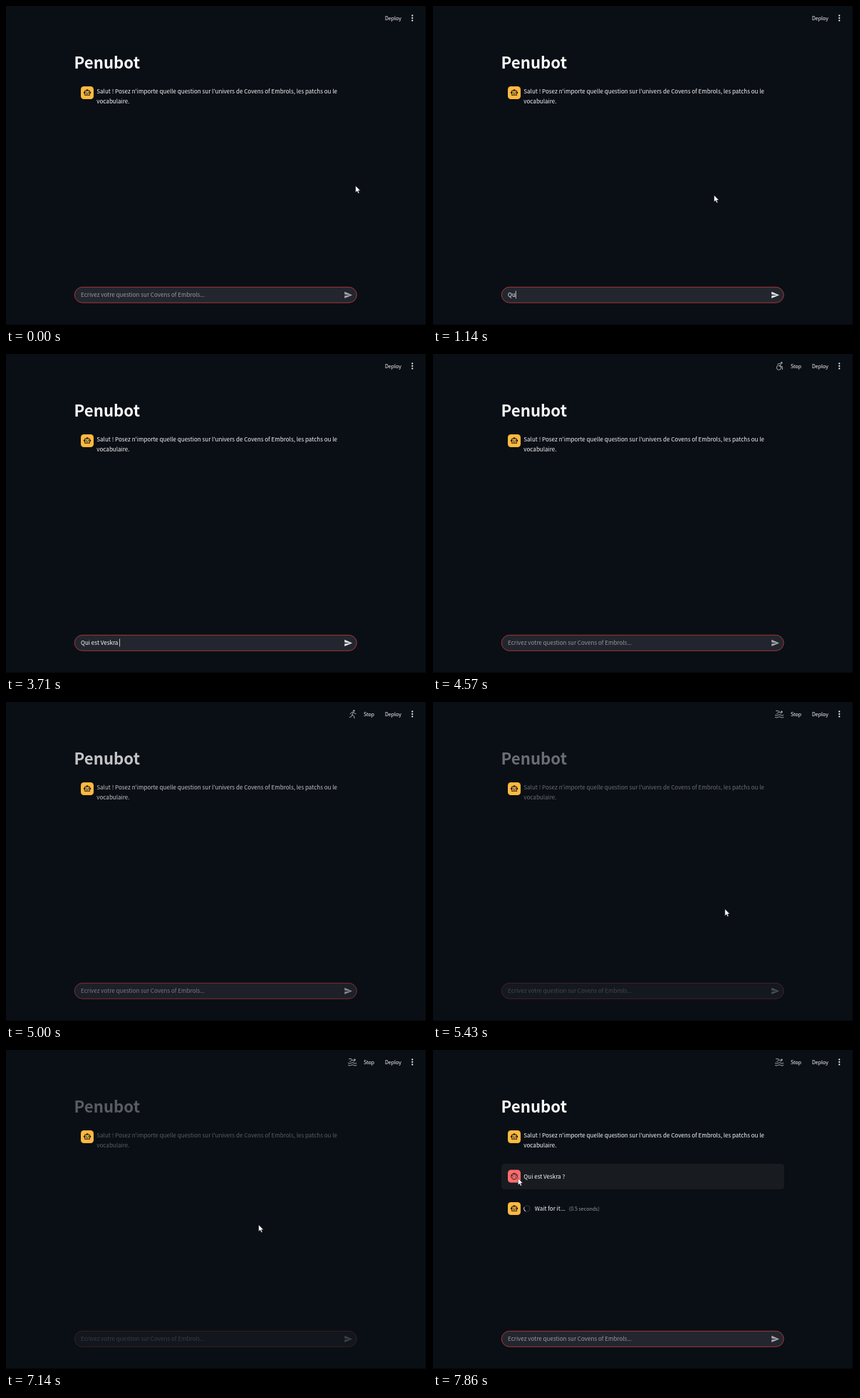
Write an HTML page that moves like this. It is 591 px wide and 450 px high and loops after 8 s.

```html
<!DOCTYPE html>
<html lang="fr">
<head>
<meta charset="utf-8">
<style>
  html, body { margin: 0; height: 100%; overflow: hidden; background: #0a0f15; }
  svg { display: block; }
  text { font: 8.06px "Noto Sans CJK JP", "Noto Sans CJK SC", "Noto Sans CJK", sans-serif; fill: #fafafa; white-space: pre; }
  .small { font-size: 7.05px; }
  .title { font-size: 22.2px; font-weight: 700; }
  .muted { fill: #96999d; }
  .line { fill: none; stroke: #a4a7aa; stroke-width: 1; stroke-linecap: round; stroke-linejoin: round; }
  .line circle { fill: #a4a7aa; stroke: none; }
  .line .wheel { fill: none; stroke: #a4a7aa; }
</style>
</head>
<body>
<svg width="591" height="450" viewBox="0 0 591 450">
  <defs>
    <g id="bot">
      <rect width="18" height="18" rx="4.3" fill="#ffb940"/>
      <g transform="translate(3.4 3.2) scale(.47)" fill="#12151a">
        <path d="M9 5a3 3 0 0 1 6 0h3a2 2 0 0 1 2 2v2a3 3 0 0 1 0 6v4a2 2 0 0 1-2 2H6a2 2 0 0 1-2-2v-4a3 3 0 0 1 0-6V7a2 2 0 0 1 2-2zM6 7v12h12V7z" fill-rule="evenodd"/>
        <circle cx="9" cy="11.5" r="1.6"/><circle cx="15" cy="11.5" r="1.6"/>
        <path d="M8 15h8v2H8z"/>
      </g>
    </g>
    <g id="user">
      <rect width="18" height="18" rx="4.3" fill="#ff6c6c"/>
      <g fill="none" stroke="#16181d">
        <circle cx="9" cy="9" r="4.3"/>
        <path d="M4.9 8.2q3 0 3.9-2.6 1.2 2.2 4.3 1.9" stroke-width=".9"/>
      </g>
      <circle cx="7.3" cy="10" r=".7" fill="#16181d"/><circle cx="10.7" cy="10" r=".7" fill="#16181d"/>
    </g>
  </defs>

  <rect width="591" height="450" fill="#0a0f15"/>
  <path d="M589 0h2v450H0v-2h589z"/>

  <text class="small" x="532" y="19.6">Deploy</text>
  <g fill="#fafafa">
    <circle cx="570.4" cy="13.4" r="1.05"/><circle cx="570.4" cy="16.9" r="1.05"/><circle cx="570.4" cy="20.4" r="1.05"/>
  </g>
  <g id="status">
    <text class="small" x="502" y="19.6">Stop</text>
    <g class="line pose">
      <circle class="wheel" cx="485.6" cy="19.2" r="3.2"/><circle cx="489.3" cy="12.4" r="1.3"/>
      <path d="M483.6 14.6l2.4-1.4 2.4 1-1.8 3.2h3.6l.4 4.4"/>
    </g>
    <g class="line pose">
      <circle cx="488.4" cy="12.2" r="1.3"/>
      <path d="M487.6 14.2l-1.8 4 2.8 1.6.4 3M486 18l-1.2 2.6-2.6 1M483.4 16.8l1.8-2.4 2.4-.2 1.8 2 1.6.2"/>
    </g>
    <g class="line pose">
      <circle cx="489.4" cy="14" r="1.4"/>
      <path d="M481.6 12.4l3.6.2 3.2 3.6M482.6 16.4l3-2M480.4 18.4q2 1.4 3.9 0t3.9 0 3.8 0M480.4 21.4q2 1.4 3.9 0t3.9 0 3.8 0"/>
    </g>
  </g>

  <g class="stale">
    <text class="title" x="95.6" y="88.3">Penubot</text>
    <text x="127.3" y="123">Salut ! Posez n'importe quelle question sur l'univers de Covens of Embrols, les patchs ou le</text>
    <text x="127.3" y="137.4">vocabulaire.</text>
  </g>
  <use href="#bot" x="105" y="113"/>

  <g id="answer">
    <rect x="96" y="160" width="397" height="36" rx="4.5" fill="#181b1f"/>
    <use href="#user" x="105" y="168.6"/>
    <text x="127.3" y="180.6">Qui est Veskra ?</text>
    <use href="#bot" x="105" y="214"/>
    <g fill="none" stroke="#fafafa" stroke-width=".9">
      <circle cx="131.8" cy="223" r="4.1" stroke-opacity=".2"/>
      <path id="spinner" d="M131.8 218.9a4.1 4.1 0 0 1 4.1 4.1"/>
    </g>
    <text x="142.8" y="226">Wait for it...</text>
    <text class="small muted" id="timer" x="190.8" y="225.8"></text>
  </g>

  <g class="stale">
    <rect x="96.3" y="395.3" width="396" height="22" rx="11" fill="#23262e" stroke="#ff4b4b" stroke-opacity=".75" stroke-width=".8"/>
    <text id="field" x="105" y="409"></text>
    <path id="caret" d="M0 400.5v11" stroke="#e8e8e8" stroke-width=".8"/>
    <path id="send" d="M2 21l21-9L2 3v7l15 2-15 2z" transform="translate(474.2 400.2) scale(.52)" fill="#fafafa"/>
  </g>

  <path id="mouse" d="M0 0v9.6l2.2-2 1.5 3.3 1.6-.7-1.4-3.2h3z" fill="#fff" stroke="#000" stroke-width=".5"/>
</svg>
<script>
const $ = id => document.getElementById(id);
const stale = document.querySelectorAll('.stale');
const poses = document.querySelectorAll('.pose');
const LOOP = 8000, STEP = LOOP / 56;
const QUESTION = 'Qui est Veskra ?';
const PLACEHOLDER = 'Ecrivez votre question sur Covens of Embrols...';
const SENT = 4140, RUNNING = 4565, ANSWERED = 7280;
// time, x, y of the pointer, for each stretch in which it is visible
const TRAILS = [
  [[0, 490.7, 252.7], [140, 490.7, 252.7], [430, 394.5, 266], [1500, 394.5, 266]],
  [[5140, 420, 315], [5430, 409.7, 291], [5800, 400, 272], [6710, 388.3, 255], [7100, 370, 250], [7800, 119.3, 180.3], [8000, 119.3, 180.3]]
];

const show = (el, on) => el.style.display = on ? '' : 'none';
const clamp = (v, lo, hi) => Math.max(lo, Math.min(hi, v));

function pointerAt(t) {
  for (const trail of TRAILS)
    for (let i = 1; i < trail.length; i++) {
      const [t0, x0, y0] = trail[i - 1], [t1, x1, y1] = trail[i];
      if (t >= t0 && t < t1) {
        const k = (t - t0) / (t1 - t0);
        return [x0 + (x1 - x0) * k, y0 + (y1 - y0) * k];
      }
    }
}

function drawInput(t) {
  const count = t < SENT ? clamp(Math.floor(.73 * (t / STEP - 8) + 2.2), 0, QUESTION.length) : 0;
  const field = $('field'), typed = QUESTION.slice(0, count);
  field.textContent = typed || PLACEHOLDER;
  field.classList.toggle('muted', !count);
  show($('caret'), count);
  if (count) $('caret').setAttribute('transform', `translate(${105.4 + field.getComputedTextLength()})`);
  $('send').setAttribute('fill-opacity', count ? .9 : .62);
}

function draw(now) {
  const t = Math.floor((now % LOOP + 5) / STEP) % 56 * STEP;
  drawInput(t);

  const fade = t < ANSWERED ? clamp((t - 4450) / 1050, 0, 1) ** 1.7 : 0;
  stale.forEach(el => el.style.opacity = 1 - .67 * fade);

  show($('status'), t >= RUNNING);
  const pose = Math.floor((t - RUNNING) / 295) % poses.length;
  poses.forEach((el, i) => show(el, i === pose));

  show($('answer'), t >= ANSWERED);
  const seconds = Math.floor(Math.max(0, t - ANSWERED) / 100) / 10;
  $('timer').textContent = `(${seconds.toFixed(1)} seconds)`;
  $('spinner').setAttribute('transform', `rotate(${(t - ANSWERED) * .48 - 70} 131.8 223)`);

  const at = pointerAt(t);
  show($('mouse'), at);
  if (at) $('mouse').setAttribute('transform', `translate(${at})`);
}

const start = performance.now();
(function tick() {
  draw(performance.now() - start);
  requestAnimationFrame(tick);
})();
</script>
</body>
</html>
```
